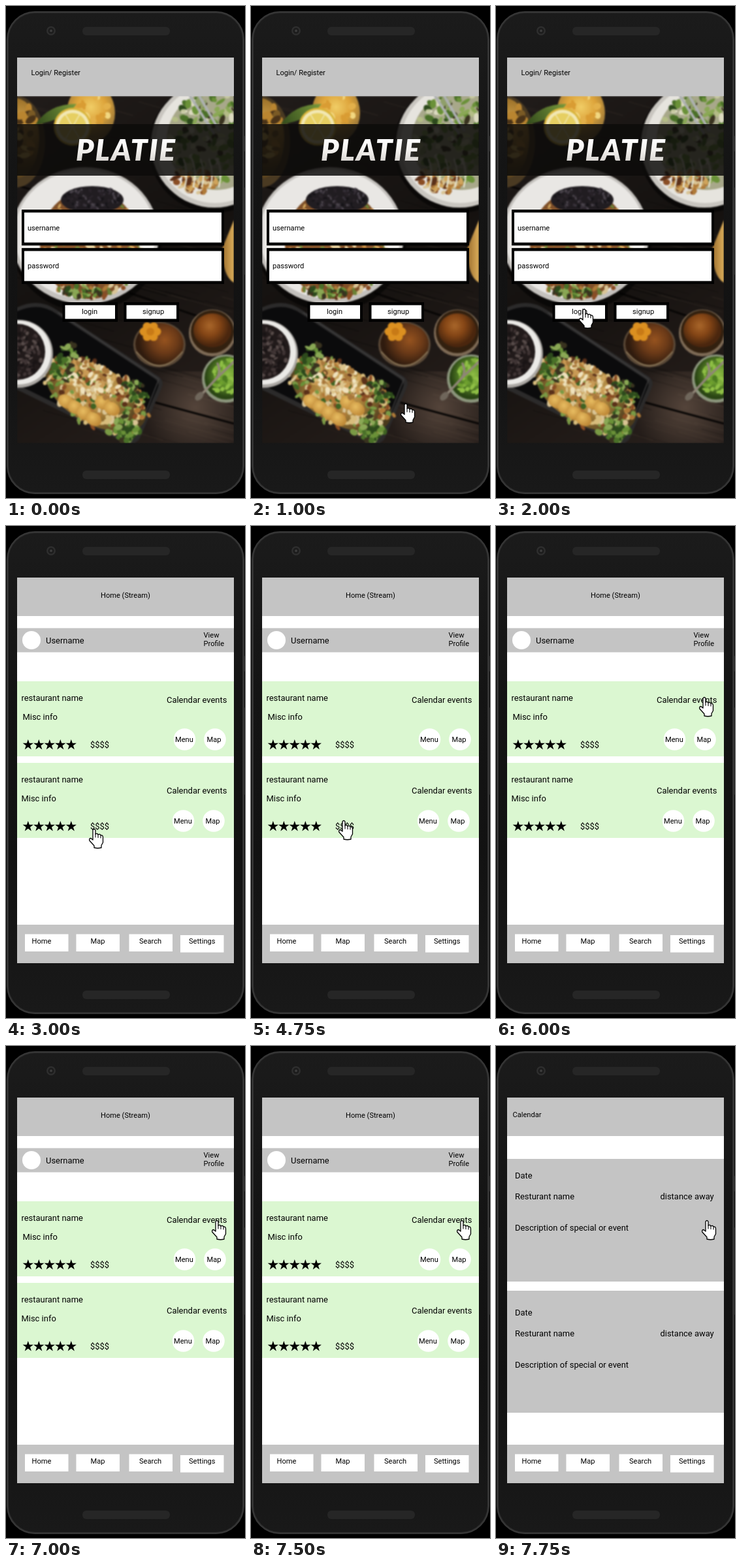
An HTML page with a canvas for the animation above (8000 ms loop, 366x754 px).

```html
<!DOCTYPE html>
<html lang="en">
<head>
<meta charset="utf-8">
<title>Restaurant app walkthrough</title>
<style>
  html, body { margin: 0; height: 100%; overflow: hidden; background: #000; }
  canvas { display: block; }
</style>
</head>
<body>
<canvas id="stage" width="366" height="754"></canvas>
<script>
const LOOP = 8000, STEP = 250;
const GRAY = '#c4c4c4', GREEN = '#dbf7d1';
const SMALL = 11.1, LARGE = 12.95;
const stage = document.getElementById('stage').getContext('2d');
let ctx = stage;

let seed = 7;
const random = () => (seed = (seed * 16807) % 2147483647) / 2147483647;
const between = (a, b) => a + (b - a) * random();

function rect(x, y, w, h, color) {
  ctx.fillStyle = color;
  ctx.fillRect(x, y, w, h);
}
function pill(x, y, w, h, r, color, edge, width = 1) {
  ctx.beginPath();
  ctx.roundRect(x, y, w, h, r);
  ctx.fillStyle = color;
  ctx.fill();
  if (edge) { ctx.strokeStyle = edge; ctx.lineWidth = width; ctx.stroke(); }
}
function oval(x, y, rx, ry, color, angle = 0) {
  ctx.beginPath();
  ctx.ellipse(x, y, rx, ry, angle, 0, 7);
  ctx.fillStyle = color;
  ctx.fill();
}
const disc = (x, y, r, color) => oval(x, y, r, r, color);
function shape(path, color) {
  ctx.fillStyle = color;
  ctx.fill(new Path2D(path));
}
function line(path, color, width) {
  ctx.strokeStyle = color;
  ctx.lineWidth = width;
  ctx.lineCap = ctx.lineJoin = 'round';
  ctx.stroke(new Path2D(path));
}
function text(str, x, y, size = LARGE) {
  ctx.font = `${size}px Roboto, sans-serif`;
  ctx.fillStyle = '#000';
  ctx.fillText(str, x, y);
}
function withStops(gradient, colors) {
  colors.forEach((c, i) => gradient.addColorStop(i / (colors.length - 1), c));
  return gradient;
}
const shade = (x0, y0, x1, y1, ...colors) =>
  withStops(ctx.createLinearGradient(x0, y0, x1, y1), colors);
const glow = (x, y, r, ...colors) =>
  withStops(ctx.createRadialGradient(x, y, 0, x, y, r), colors);

// Small crumbs spread over a tilted ellipse.
function crumbs(x, y, rx, ry, angle, count, size, colors) {
  for (let i = 0; i < count; i++) {
    const a = between(0, 6.283), d = Math.sqrt(random());
    const u = Math.cos(a) * rx * d, v = Math.sin(a) * ry * d;
    oval(x + u * Math.cos(angle) - v * Math.sin(angle),
         y + u * Math.sin(angle) + v * Math.cos(angle),
         between(.5, 1.2) * size, between(.35, .8) * size,
         colors[Math.floor(random() * colors.length)], between(0, 3));
  }
}

function photo() {
  const herbs = ['#4a7028', '#6a9138', '#8aa855', '#2d4a1c', '#39331f'];
  const warm = ['#b07a38', '#cfa45c', '#8a4d24', '#d9c495', '#5a3019'];
  ctx.save();
  ctx.beginPath();
  ctx.rect(17, 138, 332, 532);
  ctx.clip();
  rect(17, 138, 332, 532, shade(17, 138, 349, 670, '#211c1a', '#14110f', '#2a211d'));
  rect(200, 560, 149, 110, glow(290, 615, 80, '#54443a', '#54443a00'));
  for (let i = 0; i < 130; i++) {
    const x = between(-40, 349), y = between(138, 700), w = between(30, 120);
    line(`M${x} ${y}l${w} ${w * .28}`, i % 2 ? '#0004' : '#7a64541c', between(.5, 2));
  }
  line('M17 275L349 372M190 440L349 494M200 600L349 640', '#080605', 3);

  // jar, drink and lemon
  oval(16, 208, 44, 70, '#4a3a22');
  oval(14, 203, 37, 62, glow(20, 180, 70, '#d6a64c', '#a0752c', '#5a431f'));
  crumbs(22, 200, 22, 58, 0, 30, 8, ['#b98530', '#d9b458', '#4a3318', '#7a5a25']);
  oval(130, 164, 37, 45, glow(130, 155, 46, '#f0cd66', '#dda33a', '#8f7038'));
  crumbs(136, 160, 24, 26, 0, 16, 7, ['#f2d780', '#d99c33', '#e3b04a']);
  shape('M45 182Q65 150 108 150Q92 174 45 182', shade(45, 180, 108, 150, '#31491b', '#7a9a3c'));
  disc(102, 185, 29, '#d9b43a');
  disc(102, 185, 26, '#f2e8b4');
  disc(102, 185, 21, '#e6cf62');
  for (let a = 0; a < 6; a++)
    line(`M102 185l${21 * Math.cos(a * 1.047)} ${21 * Math.sin(a * 1.047)}`, '#f2e8b4', 1.5);

  // plate on the right
  disc(319, 216, 101, '#0008');
  disc(319, 212, 97, '#c9c6c0');
  disc(320, 211, 91, '#e6e4de');
  disc(322, 206, 76, '#a8a88a');
  crumbs(320, 203, 68, 70, 0, 170, 7, [...herbs, '#b4bd86', '#dcdac0', '#c6c9a0', '#8f9f6a']);
  crumbs(290, 268, 34, 18, .2, 60, 6, warm);
  line('M282 138L318 195M296 138L326 190', '#aeb1b2', 4);
  for (let i = 0; i < 5; i++)
    line(`M${272 + i * 13} 235q8 20 2 42`, '#e3e0cc', 2.5);

  // central plate
  oval(122, 358, 116, 110, '#0008');
  oval(121, 352, 113, 105, '#c4c1bd');
  oval(121, 350, 108, 99, '#e9e7e4');
  oval(128, 365, 76, 84, '#7f5029');
  crumbs(128, 370, 82, 80, 0, 300, 5, [...warm, '#6a8236']);
  oval(132, 297, 48, 21, '#211d21');
  crumbs(132, 294, 44, 17, 0, 90, 3, ['#161418', '#38323a', '#292329', '#4a444c']);
  crumbs(118, 437, 30, 10, 0, 40, 5, herbs);
  shape('M349 328L331 372Q332 415 349 424Z', shade(331, 0, 349, 0, '#9a6d2e', '#dcae5a'));

  // tray with food
  shape('M17 462Q50 446 78 466L234 568Q243 575 238 586L205 662Q198 675 180 668L17 588Z', '#2b2a2a');
  shape('M17 468Q50 453 76 471L229 572Q236 578 232 586L201 656Q195 666 181 661L17 580Z', '#0b0b0c');
  line('M80 470L234 572L200 658', '#3d3c3c', 1.5);
  oval(138, 597, 84, 44, glow(135, 585, 80, '#d9b873', '#a8803a', '#4a3a1c'), .5);
  crumbs(138, 597, 90, 48, .5, 240, 6, [...warm, '#d8bd7c', '#3f6322', '#7a9a45']);
  for (let i = 0; i < 6; i++)
    oval(92 + i * 14, 606 + i * 9 % 34, 13, 10,
         glow(90 + i * 14, 603 + i * 9 % 34, 14, '#e8bd62', '#c08a38'), .6);
  crumbs(132, 572, 52, 25, .4, 110, 5, ['#efe2bd', '#dcc48c', '#c99a55', '#a8783c']);
  crumbs(92, 548, 15, 36, .2, 45, 6, herbs);
  crumbs(183, 645, 18, 24, .3, 50, 6, herbs);
  crumbs(198, 590, 20, 14, .6, 35, 5, herbs);

  // bowl of beans
  disc(20, 533, 52, '#aaa7a3');
  disc(20, 531, 49, '#ebeae7');
  disc(17, 530, 43, '#211a1a');
  crumbs(18, 532, 38, 38, 0, 130, 4, ['#191415', '#3f3434', '#2f2626', '#574b49']);

  // drinks
  oval(235, 519, 40, 35, '#5c4a38');
  oval(235, 518, 37, 32, glow(243, 512, 40, '#96531f', '#6b3a18', '#2f1b0e'));
  line('M200 530Q235 572 270 530', '#94805f', 1.5);
  for (let a = 0; a < 6; a++)
    disc(221 + 10 * Math.cos(a * 1.047), 499 + 9 * Math.sin(a * 1.047), 6.5, '#dc9020');
  disc(221, 499, 6, '#c87a16');
  disc(316, 501, 36, '#7d6a55');
  disc(316, 499, 33, '#32200f');
  oval(316, 497, 29, 26, glow(312, 490, 30, '#a8662a', '#854616', '#4a260e'));
  disc(337, 571, 37, '#8b957c');
  disc(337, 570, 33, glow(340, 565, 34, '#8fbd45', '#5f8f2a', '#2a4514'));
  crumbs(337, 568, 27, 27, 0, 45, 5, ['#6ea02e', '#8fbf45', '#4c7c20', '#7fae3c']);
  line('M297 598L322 571L349 545M322 571Q330 560 324 548', '#8f8577', 3.5);
  oval(296, 598, 8, 5, '#6f665b', -.8);

  // soft focus
  ctx.filter = 'blur(1px)';
  ctx.drawImage(ctx.canvas, 0, 0);
  ctx.filter = 'none';
  rect(17, 181, 332, 79, 'rgba(12,11,10,.84)');
  ctx.restore();
}

function phone() {
  rect(0, 0, 366, 754, '#000');
  pill(364, 199, 2, 24, 1, '#1c1c1c');
  pill(364, 278, 2, 134, 1, '#1a1a1a');
  pill(2.5, 9.5, 361, 737, 42, shade(0, 9, 0, 747, '#1b1b1b', '#141414', '#121212', '#191919'), '#303030', 3);
  pill(2, 9, 362, 738, 42, '#0000', '#3c3c3c');
  for (const y of [32, 712]) pill(117, y, 134, 13, 6, '#262626');
  disc(69, 38, 7, '#2e2e2e');
  disc(69, 38, 4.5, '#1c1c1c');
  disc(69, 38, 2, '#3c3c3c');
}

function field(x, y, w, h) {
  rect(x, y, w, h, '#000');
  rect(x + 4, y + 4.5, w - 8, h - 9, '#fff');
}

function loginScreen() {
  rect(17, 79, 332, 59, GRAY);
  text('Login/ Register', 38.5, 106, SMALL);
  photo();
  ctx.save();
  ctx.font = 'italic 900 46px Lato, sans-serif';
  ctx.textAlign = 'center';
  ctx.letterSpacing = '2px';
  ctx.fillStyle = shade(0, 204, 0, 238, '#fff', '#f4f2ef', '#d8d5d1');
  ctx.fillText('PLATIE', 184, 236.5);
  ctx.restore();
  field(24, 312, 310, 55);
  field(24, 371, 310, 55);
  field(86.5, 454, 84.5, 30);
  field(180.5, 454, 84.5, 30);
  text('username', 33, 344, SMALL);
  text('password', 33, 402, SMALL);
  text('login', 116, 472, SMALL);
  text('signup', 209, 472, SMALL);
}

function page(title, x, y) {
  rect(17, 79, 332, 591, '#fff');
  rect(17, 79, 332, 59, GRAY);
  rect(17, 611, 332, 59, GRAY);
  text(title, x, y, SMALL);
  [['Home', 29, 39.5], ['Map', 107.5, 129.5], ['Search', 188.5, 204], ['Settings', 267, 280]]
    .forEach(([label, left, textX], i) => {
      rect(left, i == 3 ? 627 : 625.5, 66.5, 26.5, '#fff');
      text(label, textX, 640, SMALL);
    });
}

function star(x, y) {
  ctx.beginPath();
  for (let i = 0; i < 10; i++) {
    const r = i % 2 ? 3.3 : 8.6, a = i * Math.PI / 5;
    ctx.lineTo(x + r * Math.sin(a), y - r * Math.cos(a));
  }
  ctx.fillStyle = '#000';
  ctx.fill();
}

function restaurant(top, infoX, infoY, eventY, menuX, buttonY) {
  rect(17, top, 332, 115, GREEN);
  text('restaurant name', 23.5, top + 30);
  text('Misc info', infoX, infoY);
  for (let i = 0; i < 5; i++) star(33.8 + i * 16.5, top + 97.5);
  text('$$$$', 129, top + 102);
  text('Calendar events', 246, eventY);
  disc(menuX, buttonY, 16.8, '#fff');
  disc(menuX + 46.5, buttonY, 16.8, '#fff');
  text('Menu', menuX - 14.5, buttonY + 4, SMALL);
  text('Map', menuX + 34, buttonY + 4, SMALL);
}

function homeScreen() {
  page('Home (Stream)', 145, 110);
  rect(17, 156.5, 332, 37, GRAY);
  disc(39, 175, 14, '#fff');
  text('Username', 61, 180);
  text('View', 302.5, 171, SMALL);
  text('Profile', 302.5, 184, SMALL);
  restaurant(238, 25.5, 297, 271, 273.5, 327);
  restaurant(363, 23.5, 422, 410, 271.5, 452);
}

function calendarScreen() {
  page('Calendar', 25.5, 109);
  for (const y of [0, 210]) {
    rect(17, y ? 375 : 173, 332, y ? 187 : 188, GRAY);
    text('Date', 29, 203 + y);
    text('Resturant name', 29, 235 + y);
    text('distance away', 251.5, 235 + y);
    text('Description of special or event', 29, 283 + y);
  }
}

function hand(x, y) {
  ctx.save();
  ctx.translate(x, y);
  const outline = 'M6 2Q8 -1 10 2V8Q13 6.5 14 9Q17 7.5 18 10Q21.5 9.5 21.5 13V21L19 25.5V29Q13.5 30.5 8 29V26L.8 18Q0 14.5 3 14.5L6 17Z';
  shape(outline, '#fff');
  line(outline, '#000', 1.3);
  line('M10 8V13M14 9V13.5M18 10.5V14', '#000', 1.1);
  ctx.restore();
}

// Each screen is painted once, then shown from its start time.
const screens = [[0, loginScreen], [3000, homeScreen], [7750, calendarScreen]].map(([start, paint]) => {
  const canvas = document.createElement('canvas');
  canvas.width = 366;
  canvas.height = 754;
  const repaint = () => {
    seed = 7;
    ctx = canvas.getContext('2d');
    phone();
    paint();
    ctx = stage;
  };
  repaint();
  document.fonts.ready.then(repaint);
  return { start, canvas };
});

// start time, left, top
const pointer = [
  [750, 229, 657], [1000, 229, 609], [1250, 149, 512], [1500, 146, 484], [1750, 133, 469],
  [2000, 127, 464], [4750, 134, 451], [5000, 194, 310], [5250, 262, 262], [5500, 294, 285],
  [5750, 309, 282], [6000, 311, 262], [7000, 315, 267]
];

function draw(now) {
  const t = Math.floor(now % LOOP / STEP) * STEP;
  ctx.drawImage(screens.findLast(s => s.start <= t).canvas, 0, 0);
  const spot = pointer.findLast(p => p[0] <= t);
  if (spot) hand(spot[1], spot[2]);
  requestAnimationFrame(draw);
}
requestAnimationFrame(draw);
</script>
</body>
</html>
```
